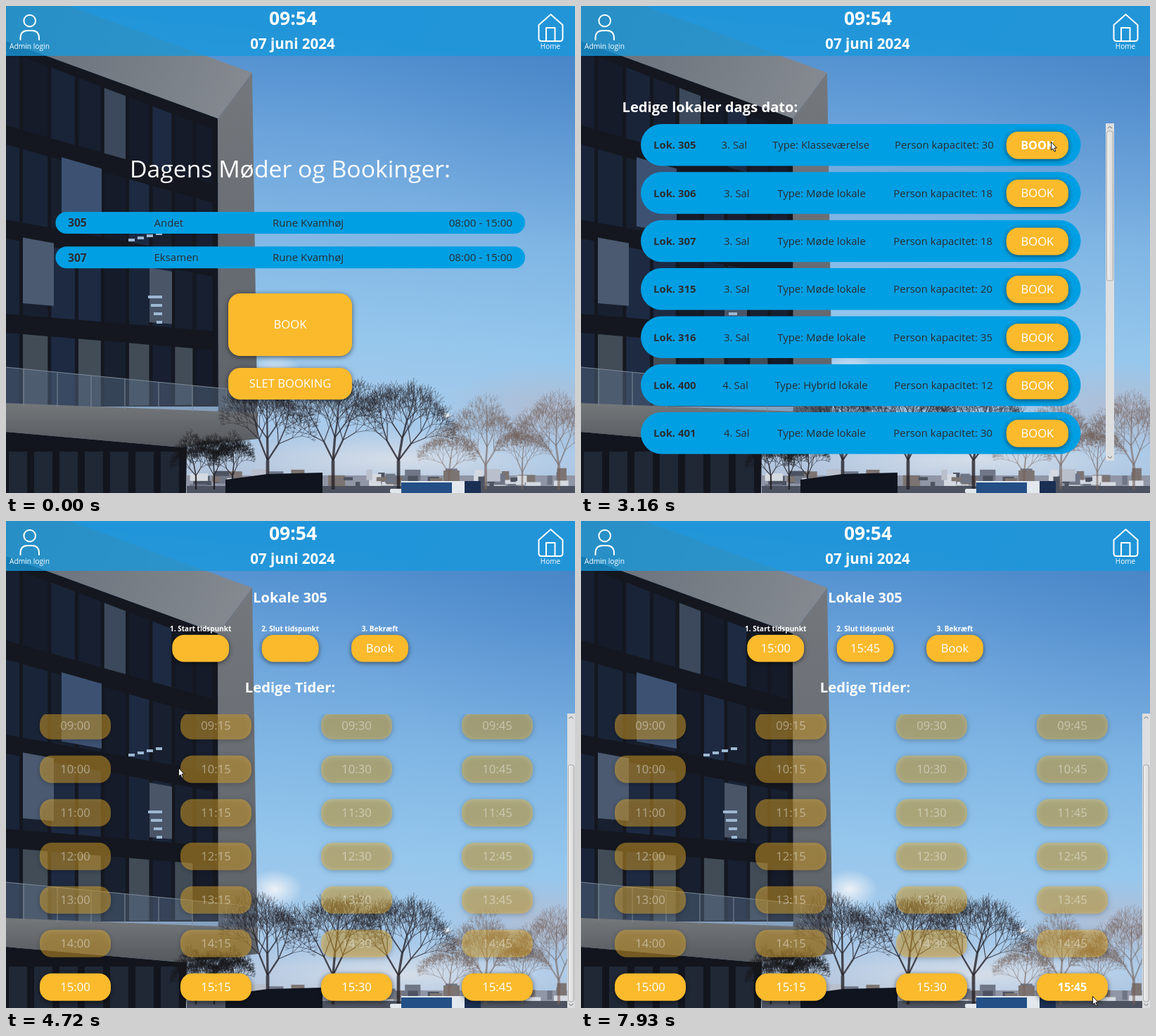
Write an HTML page with a canvas that moves like this. It is 809x693 px and loops after 8000 ms.

```html
<!DOCTYPE html>
<html lang="da">
<head>
<meta charset="utf-8">
<title>Lokalebooking</title>
<style>
  html, body { margin: 0; width: 100%; height: 100%; overflow: hidden; }
  canvas { display: block; }
</style>
</head>
<body>
<canvas id="stage" width="809" height="693"></canvas>
<script>
const W = 809, H = 693, LOOP = 8000;
const BLUE = '#009fe3', YELLOW = '#fbba2c', DARK = '#2b2d33';
const stage = document.getElementById('stage').getContext('2d');
let c = stage;

// ---------- drawing helpers ----------
function poly(fill, ...p) {
  c.beginPath();
  for (let i = 0; i < p.length; i += 2) c.lineTo(p[i], p[i + 1]);
  c.closePath();
  c.fillStyle = fill;
  c.fill();
}

function box(fill, x, y, w, h, r = 0) {
  c.beginPath();
  c.roundRect(x, y, w, h, r);
  c.fillStyle = fill;
  c.fill();
}

function gradient(x0, y0, x1, y1, ...colors) {
  const g = c.createLinearGradient(x0, y0, x1, y1);
  colors.forEach((color, i) => g.addColorStop(i / (colors.length - 1), color));
  return g;
}

function setFont(size, bold) {
  c.font = `${bold ? 700 : 400} ${size}px "Open Sans", "Noto Sans", sans-serif`;
}

// y is the middle of the capitals; returns the width
function text(str, x, y, size, { align = 'center', bold = false, fill = '#fff' } = {}) {
  setFont(size, bold);
  c.textAlign = align;
  c.fillStyle = fill;
  c.fillText(str, x, y + size * 0.357);
  return c.measureText(str).width;
}

function glow(color, x, y, rx, ry) {
  c.save();
  c.translate(x, y);
  c.scale(rx, ry);
  const g = c.createRadialGradient(0, 0, 0, 0, 0, 1);
  g.addColorStop(0, color);
  g.addColorStop(1, color.slice(0, 7) + '00');
  c.fillStyle = g;
  c.fillRect(-1, -1, 2, 2);
  c.restore();
}

// ---------- backdrop ----------
let seed = 11;
const rnd = () => (seed = (seed * 16807) % 2147483647) / 2147483647;
const pick = list => list[Math.floor(rnd() * list.length)];

// a leader that keeps climbing, with a shorter twig on each side
function branch(x, y, len, lean, width, depth) {
  const x2 = x + Math.sin(lean) * len, y2 = y - Math.cos(lean) * len;
  c.lineWidth = width;
  c.beginPath();
  c.moveTo(x, y);
  c.lineTo(x2, y2);
  c.stroke();
  if (!depth) return;
  for (const side of [-1, 0, 1]) {
    const ratio = (side ? 0.72 : 0.82) + (rnd() - 0.5) * 0.16;
    const turn = side * 0.55 + (rnd() - 0.5) * 0.35;
    branch(x2, y2, len * ratio, lean * 0.8 + turn, Math.max(0.45, width * (side ? 0.5 : 0.7)), depth - 1);
  }
}

function tree(x, height, color) {
  c.strokeStyle = color;
  branch(x, 688, height * 0.23, 0, height / 38, 6);
}

function facade() {
  poly(gradient(0, 0, 350, 140, '#666d78', '#868b91'), 90, 0, 350, 95, 301, 160, 0, 50, 0, 0);
  poly(gradient(0, 95, 0, 600, '#74787d', '#5d6269'), 301, 160, 350, 95, 358, 616, 302, 616);
  poly('#14171f', 0, 50, 301, 160, 302, 570, 0, 570);

  // each floor line runs from a left height to a right height
  const floor = (k, x) => 45 + 134 * k + (115 - 30 * k) * x / 301;
  const band = (fill, k, x0, x1, top, bottom) =>
    poly(fill, x0, floor(k, x0) + top, x1, floor(k, x1) + top, x1, floor(k + 1, x1) - bottom, x0, floor(k + 1, x0) - bottom);
  for (let k = 0; k < 4; k++) {
    for (let i = 0, x = -18; x < 290; i++) {
      const w = 42 - i * 1.7;
      const shade = k == 3 && i % 2 ? '#414c57' : pick(['#171f30', '#1a2438', '#151b29', '#1d2a42', '#18202f', '#3c495c']);
      band(shade, k, Math.max(x, 0), Math.min(x + w - 5, 299), 18, 9);
      x += w;
    }
  }
  band('#3d5273', 1, 79, 136, 14, 14);
  band('#4b5a70', 2, 24, 68, 12, 26);
  band('#4a5568', 2, 204, 236, 22, 14);
  for (let i = 0; i < 4; i++) {
    box('#9db8d2', 202 + i * 4, 412 + i * 12, 20 - i * 4, 4);
    box('#9db8d2', 174 + i * 13, 331 - i * 3, 9, 4);
  }

  // glass balustrade, concrete slab and the ground floor
  poly('rgba(92,112,138,.45)', 0, 514, 357, 549, 357, 580, 0, 567);
  poly(gradient(0, 565, 0, 628, '#74777a', '#55595e'), 0, 565, 358, 579, 358, 616, 250, 628, 0, 606);
  poly('#12151d', 0, 606, 250, 628, 257, 627, 256, H, 0, H);
  c.strokeStyle = '#7d8997';
  c.lineWidth = 1;
  c.beginPath();
  c.moveTo(0, 514);
  c.lineTo(357, 549);
  for (let x = 25; x < 350; x += 48) { c.moveTo(x, 514 + x / 10); c.lineTo(x, 568 + x / 28); }
  c.stroke();
  for (let x = 4; x < 250; x += 36) box('#202735', x, 634, 26, 59);
}

function icons() {
  c.strokeStyle = '#fff';
  c.lineWidth = 2;
  c.lineJoin = c.lineCap = 'round';
  c.stroke(new Path2D('M42 21a8.3 8.3 0 1 1-16.6 0a8.3 8.3 0 1 1 16.6 0M20.5 48v-2q0-11 10-11h6.5q10 0 10 11v2'));
  c.stroke(new Path2D('M757.5 27L774.5 12L791.5 27V46q0 4-4 4h-26q-4 0-4-4ZM768 50V31h12.5V50'));
}

function paintBackdrop() {
  c.fillStyle = gradient(0, 0, -60, H, '#4b8bcd', '#6aa2da', '#80b6e4', '#94c6ec', '#a9caea', '#b9bfd0');
  c.fillRect(0, 0, W, H);
  glow('#3f78bb44', W, 90, 330, 250);
  glow('#f2f4f8ee', 382, 524, 40, 28);
  glow('#b4b9cbcc', 770, 575, 150, 65);
  glow('#dfe3eacc', 560, 645, 260, 42);
  glow('#ffffffdd', 626, 583, 10, 6);

  facade();

  // distant town
  box('#9096a6', 257, 668, W, 25);
  for (let i = 0; i < 70; i++) {
    const h = 4 + rnd() * 14;
    box(pick(['#6f7686', '#b9bfcb', '#7c7472', '#d5d9e1', '#4d5361']), 257 + rnd() * 552, 686 - h - rnd() * 12, 6 + rnd() * 20, h);
  }
  box('#4c525f', 257, 683, W, 10);
  for (let i = 0; i < 4; i++) tree(630 + i * 52, i % 2 ? 150 : 105, 'rgba(118,98,90,.6)');
  for (let i = 0; i < 3; i++) {
    tree(270 + i * 26, 85, 'rgba(26,24,28,.85)');
    tree(372 + i * 93, 180, 'rgba(38,34,40,.8)');
  }
  poly('#10141e', 312, 674, 372, 666, 450, 664, 450, H, 312, H);
  box('#e3e8ef', 546, 687, 20, 6, 2);
  box('#e3e8ef', 562, 676, 113, 17);
  box('#234f86', 562, 678, 72, 15);
  box('#1a2f52', 652, 676, 23, 17);

  box('rgba(22,153,221,.78)', 0, 0, W, 71);
  text('09:54', 408, 18, 26.5, { bold: true });
  text('07 juni 2024', 407.5, 54, 20.5, { bold: true });
  text('Admin login', 33.5, 57.5, 10.2);
  text('Home', 774, 57.5, 10);
  icons();
}

const backdrop = document.createElement('canvas');
backdrop.width = W;
backdrop.height = H;
c = backdrop.getContext('2d');
paintBackdrop();
c = stage;

// ---------- pointer ----------
const moves = [ // from, to, x, y
  [130, 270, 502, 510], [470, 1050, 402, 428], [1050, 1220, 404, 449],
  [1750, 1860, 371, 442], [1860, 2090, 426, 377], [2090, 2490, 678, 192], [2560, 2770, 668, 193],
  [3430, 3760, 400, 176], [3760, 4170, 191, 283], [4240, 4720, 245, 351], [4720, 5350, 309, 440],
  [5550, 6160, 110, 661], [6620, 6900, 540, 674], [7120, 7720, 727, 676]
];
const clicks = [[1350, 1420], [3030, 3160], [6230, 6360], [7860, 7930]];
let mouse;

function pointerAt(t) {
  if (t < moves[0][0]) return { x: -99, y: -99 };
  let x = 702, y = 648;
  for (const [from, to, toX, toY] of moves) {
    const f = Math.min(1, Math.max(0, (t - from) / (to - from)));
    x += (toX - x) * f;
    y += (toY - y) * f;
  }
  return { x, y };
}

function drawPointer(t) {
  c.save();
  c.translate(mouse.x, mouse.y);
  if (clicks.some(([from, to]) => t >= from && t < to)) box('rgba(255,236,0,.75)', -11.5, -10.5, 21, 21, 10.5);
  poly('#fff', 0.5, 0.5, 0.5, 12, 3, 9.8, 5, 14.2, 6.8, 13.4, 5, 9, 8.4, 9);
  c.strokeStyle = '#111';
  c.lineWidth = 1;
  c.stroke();
  c.restore();
}

// ---------- screens ----------
function button(label, x, y, w, h, off = false) {
  const bold = !off && mouse.x >= x && mouse.x <= x + w && mouse.y >= y && mouse.y <= y + h;
  c.save();
  if (off) c.globalAlpha = 0.43;
  c.save();
  c.shadowColor = 'rgba(0,0,0,.55)';
  c.shadowBlur = 7;
  c.shadowOffsetY = 1.5;
  box(YELLOW, x, y, w, h, 17);
  c.restore();
  text(label, x + w / 2, y + h / 2, bold ? 16.2 : 16.6, { bold });
  c.restore();
}

function scrollbar(x, top, w, bottom, thumbTop, thumbHeight) {
  box('#dcdee0', x, top, w, bottom - top);
  box(gradient(x, 0, x + w, 0, '#f4f4f4', '#d2d2d2'), x + 1.5, thumbTop, w - 3, thumbHeight, 3);
  c.strokeStyle = '#a8a8a8';
  c.lineWidth = 1;
  c.stroke();
  const m = x + w / 2;
  c.strokeStyle = '#666';
  c.beginPath();
  for (const [y, d] of [[top + 6, 1], [bottom - 5, -1]]) {
    c.moveTo(m - 3, y + d);
    c.lineTo(m, y - 1.5 * d);
    c.lineTo(m + 3, y + d);
  }
  c.stroke();
}

function home() {
  text('Dagens Møder og Bookinger:', 404, 231.5, 33.7);
  [['305', 'Andet'], ['307', 'Eksamen']].forEach(([room, kind], i) => {
    const y = 293 + i * 49.3, mid = y + 15.7, cell = { align: 'left', fill: DARK };
    box(BLUE, 70.5, y, 667.5, 31, 15.5);
    text(room, 88, mid, 15.6, { ...cell, bold: true });
    text(kind, 210.5, mid, 15, cell);
    text('Rune Kvamhøj', 379, mid, 15, cell);
    text('08:00 - 15:00', 720, mid, 15.2, { align: 'right', fill: DARK });
  });
  button('BOOK', 316, 409, 176, 89);
  button('SLET BOOKING', 316, 515, 176, 45);
}

const seats = { 305: 30, 306: 18, 307: 18, 315: 20, 316: 35, 400: 12, 401: 30 };
const kinds = { 305: 'Klasseværelse', 400: 'Hybrid lokale' };

function roomList() {
  text('Ledige lokaler dags dato:', 58.5, 143.5, 20.15, { align: 'left', bold: true });
  Object.keys(seats).forEach((room, i) => {
    const y = 168 + i * 68.35, left = 103, buttonWidth = 88.3, right = 693;
    const cells = ['Lok. ' + room, room[0] + '. Sal', 'Type: ' + (kinds[room] ?? 'Møde lokale'), 'Person kapacitet: ' + seats[room]];
    box(BLUE, 85, y, 625.5, 59.5, 29.7);
    // spread the cells evenly, with half a gap before the button
    const widths = cells.map((cell, k) => (setFont(14.9, !k), c.measureText(cell).width));
    const gap = (right - left - buttonWidth - widths.reduce((a, b) => a + b)) / 3.5;
    cells.reduce((x, cell, k) =>
      x + gap + text(cell, x, y + 30, 14.9, { align: 'left', bold: !k, fill: DARK }), left);
    button('BOOK', right - buttonWidth, y + 10.7, buttonWidth, 39);
  });
  scrollbar(746, 167, 12, 647, 178, 213);
}

function timeGrid(t) {
  const scroll = t < 4340 ? 0 : t < 4470 ? 40 : 77;
  text('Lokale 305', 404, 109, 20, { bold: true });
  const start = t >= 6360 ? '15:00' : '', end = t >= 7930 ? '15:45' : '';
  [['1. Start tidspunkt', start], ['2. Slut tidspunkt', end], ['3. Bekræft', 'Book']].forEach(([head, label], i) => {
    const x = 236.3 + i * 127.4;
    text(head, x + 40.4, 153.5, 10, { bold: true });
    button(label, x, 162, 80.8, 38.5);
  });
  text('Ledige Tider:', 404, 237, 20.2, { bold: true });

  c.save();
  c.beginPath();
  c.rect(0, 275, W, H);
  c.clip();
  const pad = n => String(n).padStart(2, '0');
  for (let i = 0; i < 32; i++) {
    const row = i >> 2, col = i % 4;
    button(`${pad(8 + row)}:${pad(col * 15)}`, 48 + col * 200, 286.7 + row * 62 - scroll, 101, 39, row < 7);
  }
  c.restore();
  scrollbar(798, 274, 11, H, 285 + scroll * 0.805, 337);
}

function frame(now) {
  const t = now % LOOP;
  mouse = pointerAt(t);
  c.drawImage(backdrop, 0, 0);
  if (t < 1490) home();
  else if (t < 3230) roomList();
  else timeGrid(t);
  drawPointer(t);
  requestAnimationFrame(frame);
}
requestAnimationFrame(frame);
</script>
</body>
</html>
```
